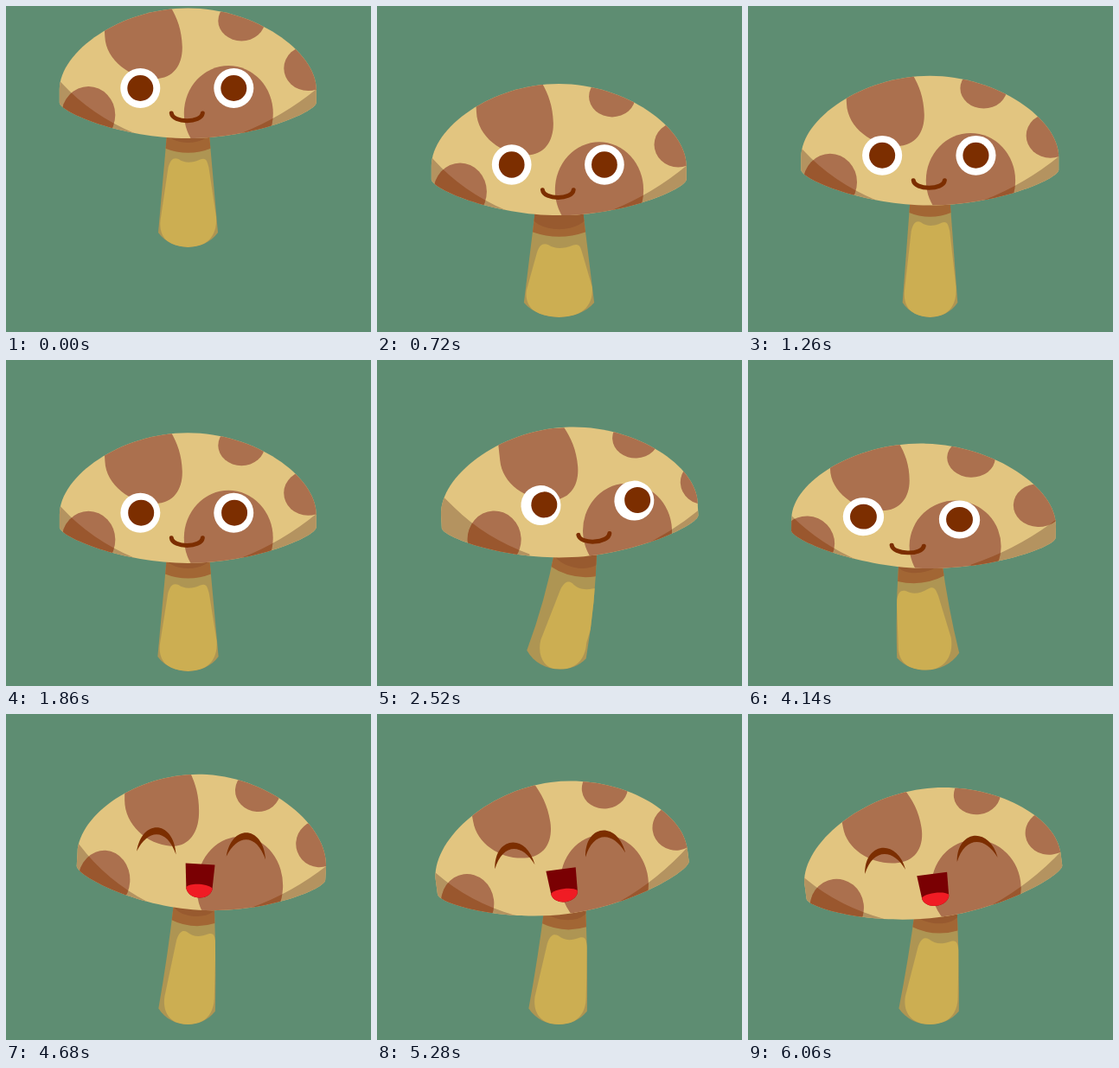
Recreate the animation shown at these times as an HTML page. Size 422 by 377 pixels, loop 6600 ms.

```html
<!DOCTYPE html>
<html lang="en">
<head>
<meta charset="utf-8">
<title>Mushroom</title>
<style>
  html, body { margin: 0; width: 100%; height: 100%; overflow: hidden; background: #5e8d72; }
  svg { display: block; width: 100%; height: 100%; }
</style>
</head>
<body>
<svg viewBox="0 0 422 377">
  <defs>
    <path id="capShape" d="M-148.5-41V-56C-148.5-101-77-150.5 0-150.5S148.5-101 148.5-56V-41C147-30 76 0 0 0S-147-30-148.5-41Z"/>
    <path id="shade" d="M-190-112L-146-64Q-112-27-62-6V20H-190ZM190-94L150-58Q110-25 62-6V20H190Z"/>
    <g id="spots">
      <path d="M-96-118C-95-90-66-69-38-69C-16-69-6-86-6.5-106C-7-126-13-140-20-152H-98Z"/>
      <ellipse cx="47" cy="-29" rx="51.5" ry="55"/>
      <ellipse cx="62" cy="-136" rx="27" ry="23.5"/>
      <ellipse cx="139" cy="-81" rx="28" ry="26"/>
      <ellipse id="edgeSpot" cx="-115" cy="-27" rx="31" ry="33"/>
    </g>
    <clipPath id="capClip"><use href="#capShape"/></clipPath>
    <clipPath id="shadeClip"><use id="shadeMask" href="#shade"/></clipPath>
    <clipPath id="stemClip"><path id="stemMask"/></clipPath>
  </defs>
  <rect width="422" height="377" fill="#5e8d72"/>
  <g id="body">
    <path id="stem" fill="#ae9553"/>
    <g clip-path="url(#stemClip)">
      <path id="glow" fill="#ccae52"/>
      <path id="collar" fill="#a26634"/>
      <ellipse id="under" fill="#985a2f"/>
    </g>
    <g id="cap">
      <use href="#capShape" fill="#e2c580"/>
      <g clip-path="url(#capClip)">
        <use id="shadeTan" href="#shade" fill="#b49360"/>
        <use id="spotsLit" href="#spots" fill="#ab704e"/>
        <g clip-path="url(#shadeClip)">
          <use id="spotsDim" href="#spots" fill="#9a572e"/>
        </g>
      </g>
      <g id="eyes">
        <g id="openEyes">
          <g fill="#fff"><circle cx="-55" cy="-58" r="23"/><circle cx="53" cy="-58" r="23"/></g>
          <g id="pupils" fill="#7c2e00"><circle cx="-55" cy="-58" r="15"/><circle cx="53" cy="-58" r="15"/></g>
        </g>
        <g id="happyEyes" fill="#7c2e00">
          <path id="arc" d="M-78-61C-74-98-36-98-31-60C-43-88-66-88-78-61Z"/>
          <use href="#arc" x="107"/>
        </g>
      </g>
      <g id="mouth">
        <path id="smile" d="M-19-29C-17.5-17.5 15.5-17.5 17-29" fill="none" stroke="#7c2e00" stroke-width="5" stroke-linecap="round"/>
        <g id="laugh">
          <path d="M-19-51H16L14.5-23C11-10.5-13-10.5-16.5-23Z" fill="#7a0003"/>
          <path d="M-16.5-25C-12-30 9-30 14.5-25V-23C11-10.5-13-10.5-16.5-23Z" fill="#f01c24"/>
        </g>
      </g>
    </g>
  </g>
</svg>
<script>
const LOOP = 6600, STEP = 60, END = 6060;
const LAND = 300, CROUCH = 3300, POP = 4320;

const $ = id => document.getElementById(id);
const set = (id, attrs) => { for (const k in attrs) $(id).setAttribute(k, attrs[k]); };
const move = (id, x, y = 0) => set(id, { transform: `translate(${x} ${y})` });
const show = (id, on) => set(id, { display: on ? 'inline' : 'none' });

const part = (t, from, to) => Math.min(1, Math.max(0, (t - from) / (to - from)));
const ease = (t, from, to) => { const u = part(t, from, to); return u * u * (3 - 2 * u); };
const hop = (t, from, to) => Math.sin(Math.PI * part(t, from, to));

// Damped swing: age since release, period and fade time in ms.
const swing = (wave, age, period, fade) => wave(2 * Math.PI * age / period) * Math.exp(-age / fade);

function pose(t) {
  const land = t < LAND ? 0 : swing(Math.sin, t - LAND, 1100, 600);
  const wind = part(t, CROUCH, POP) ** 4;
  const bounce = t < POP ? wind : swing(Math.cos, t - POP, 600, 700);
  // Side to side: -1 is left, 1 is right; the eyes lead the head.
  const side = ease(t, 1860, 2280) - 2 * ease(t, 2460, 3000) + wind;
  const gaze = ease(t, 1800, 2100) - 2 * ease(t, 2400, 2760) + ease(t, 3600, 4080);
  const lift = hop(t, 1980, 2700) + hop(t, 2700, 3600);
  const pop = ease(t, POP, 4500), sway = ease(t, 4500, 5280);
  return {
    drop: t < LAND ? -81 * (1 - (t / LAND) ** 2) : 0,
    x: 210.3 + 16 * side + 13 * pop - 2.5 * sway,
    y: 234 + 24 * land + 15 * bounce - 8.5 * lift,
    tilt: -3.1 * side + 5 * pop - 12.5 * sway,
    squash: 0.09 * bounce - 0.03 * land,
    lean: 21 * side + 7 * pop,
    turn: 24 * side,
    look: 8 * gaze,
    wide: 1 + 0.53 * land + 0.1 * bounce,
    neck: 30 * land + 9 * lift + 2 * pop,
    happy: t > POP
  };
}

// Local frame: turns points around a centre and prints them as path coordinates.
function frame(cx, cy, deg, scale) {
  const c = Math.cos(deg * Math.PI / 180), s = Math.sin(deg * Math.PI / 180);
  return (x, y) => {
    x *= scale;
    return `${(cx + x * c - y * s).toFixed(2)} ${(cy + x * s + y * c).toFixed(2)} `;
  };
}

function drawStem({ lean, neck, wide, y }) {
  const tx = 210.5 + lean, topY = y - 10, topWide = 1 + (wide - 1) * 0.7, half = 24 * topWide;
  const bx = 210.5 - Math.min(3, Math.abs(lean) * 0.2), by = 343 - Math.abs(lean) * 0.13;
  const base = frame(bx, by, lean * 0.4, wide);
  const top = frame(tx, y, lean * 0.65, topWide);
  const bend = dir => `${(tx + bx) / 2 + lean * 0.25 + dir * (half + 34.5 * wide) / 2} ${(topY + by) / 2} `;

  const d = `M${tx - half} ${topY}Q${bend(-1)}${base(-34.5, 0)}` +
    `C${base(-18, 22.5)}${base(18, 22.5)}${base(34.5, 0)}Q${bend(1)}${tx + half} ${topY}Z`;
  set('stem', { d });
  set('stemMask', { d });

  const l = Math.max(0, lean) * 0.6, r = Math.min(0, lean) * 0.5;
  const g = (x, v) => top(x + lean * 0.7, v + neck);
  set('glow', {
    d: `M${base(-32 + l, -14)}L${g(-23, 34)}C${g(-20, 23)}${g(-16, 22)}${g(-11, 24)}` +
       `C${g(-4, 29)}${g(4, 29)}${g(14, 24.5)}C${g(21, 22)}${g(22, 26)}${g(24, 34)}` +
       `L${base(32.5 + r, -18)}C${base(34 + r, 6)}${base(20 + r, 17)}${base(0, 17)}` +
       `C${base(-22 + l, 17)}${base(-34 + l, 6)}${base(-32 + l, -14)}Z`
  });

  const rim = 11.5 + neck * 0.8;
  set('collar', { d: `M${top(-45, -40)}L${top(45, -40)}L${top(27, rim)}Q${top(0, rim + 10.5)}${top(-27, rim)}Z` });
  set('under', {
    cx: tx, cy: y - 8 + neck * 0.6, rx: 25 * topWide + neck * 0.5, ry: 13 + neck * 0.5,
    transform: `rotate(${lean * 0.65} ${tx} ${y})`
  });
}

function drawCap({ x, y, tilt, squash, turn, look, happy }) {
  const rise = Math.abs(turn) / 6;
  set('cap', { transform: `translate(${x} ${y}) rotate(${tilt}) scale(${1 + squash * 0.7} ${1 - squash})` });
  for (const id of ['shadeTan', 'shadeMask']) move(id, turn * 0.6);
  for (const id of ['spotsLit', 'spotsDim']) move(id, turn * 0.84, rise * 0.5);
  move('edgeSpot', turn * 0.35);
  move('eyes', turn, -rise);
  move('mouth', turn * 1.25, rise);
  move('pupils', look, -Math.abs(look) / 8);
  for (const id of ['openEyes', 'smile']) show(id, !happy);
  for (const id of ['happyEyes', 'laugh']) show(id, happy);
}

function draw(time) {
  const p = pose(Math.min(END, Math.floor(time / STEP) * STEP));
  move('body', 0, p.drop);
  drawStem(p);
  drawCap(p);
}

const start = performance.now();
function tick() {
  draw((performance.now() - start) % LOOP);
  requestAnimationFrame(tick);
}
tick();
</script>
</body>
</html>
```
